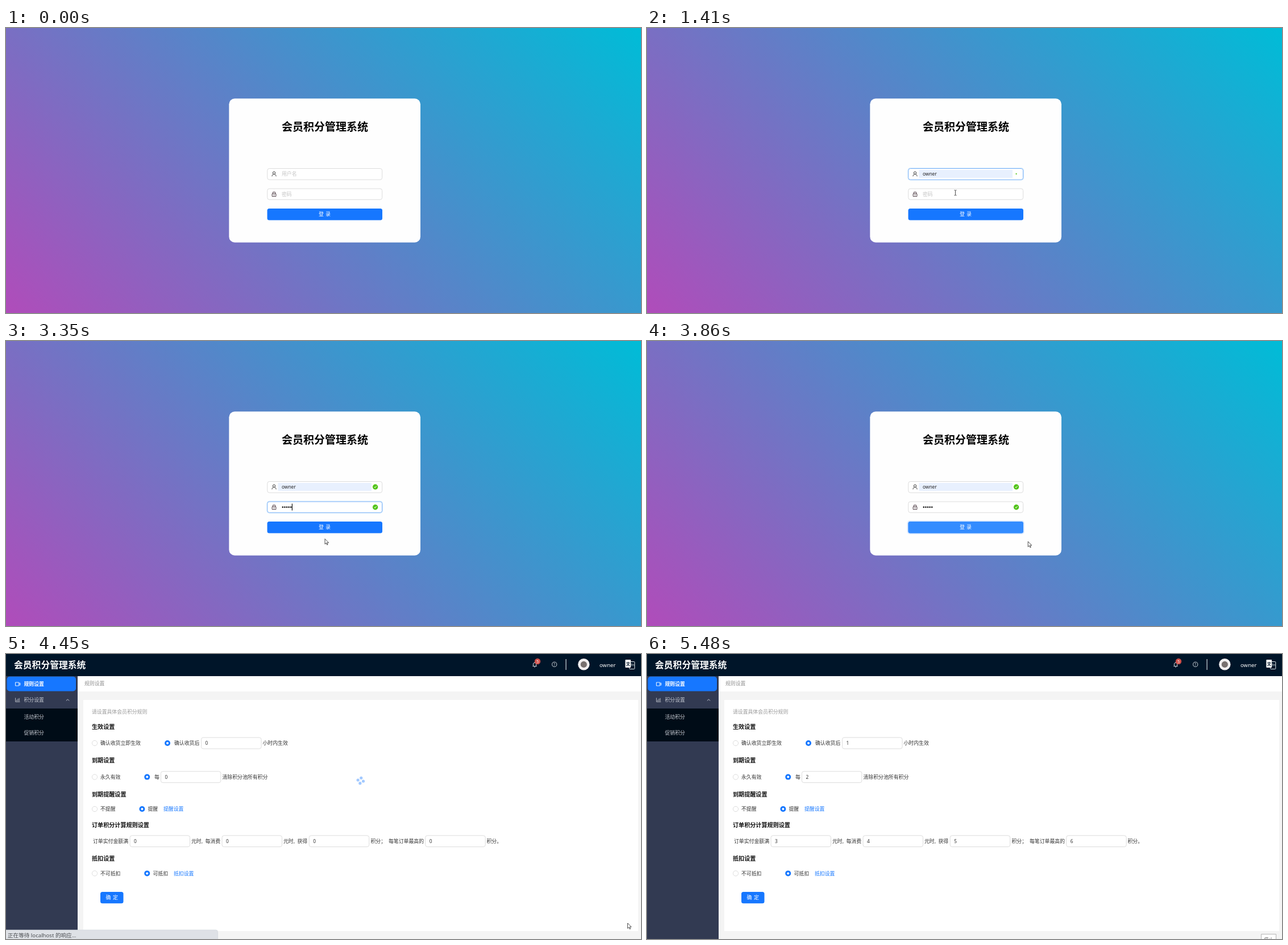
Recreate the animation shown at these times as an HTML page with a canvas. Size 1117 px wide and 502 px high, loop 5530 ms.

```html
<!DOCTYPE html>
<html lang="zh-CN">
<head>
<meta charset="utf-8">
<title>会员积分管理系统</title>
<style>
  html, body { margin: 0; width: 100%; height: 100%; overflow: hidden; }
  canvas { display: block; }
</style>
</head>
<body>
<canvas id="stage" width="1117" height="502"></canvas>
<script>
const W = 1117, H = 502, LOOP = 5530;
const BLUE = '#1677ff', INK = '#333', GREY = '#d9d9d9';
const FONT = '"Noto Sans", "Noto Sans CJK SC", sans-serif';
const TITLE = '会员积分管理系统', USER = 'owner';
const ctx = document.getElementById('stage').getContext('2d');

const clamp = v => Math.max(0, Math.min(1, v));
const ramp = (t, a, b) => clamp((t - a) / (b - a));
const within = (t, a, b) => t >= a && t < b;

function text(s, x, cy, size = 8.9, color = INK, weight = 400, align = 'left') {
  ctx.font = `${weight} ${size}px ${FONT}`;
  ctx.fillStyle = color;
  ctx.textAlign = align;
  ctx.fillText(s, x, cy + size * 0.37);
}

function rect(x, y, w, h, color) {
  ctx.fillStyle = color;
  ctx.fillRect(x, y, w, h);
}

function box(x, y, w, h, r, fill, stroke, lw = 1) {
  ctx.beginPath();
  ctx.roundRect(x, y, w, h, r);
  if (fill) { ctx.fillStyle = fill; ctx.fill(); }
  if (stroke) { ctx.strokeStyle = stroke; ctx.lineWidth = lw; ctx.stroke(); }
}

function disc(x, y, r, fill, stroke, lw = 1) {
  ctx.beginPath();
  ctx.arc(x, y, r, 0, Math.PI * 2);
  if (fill) { ctx.fillStyle = fill; ctx.fill(); }
  if (stroke) { ctx.strokeStyle = stroke; ctx.lineWidth = lw; ctx.stroke(); }
}

// Draws an SVG path with its origin moved to x, y.
function path(d, x, y, stroke, lw = 1, fill) {
  const p = new Path2D(d);
  ctx.save();
  ctx.translate(x, y);
  if (fill) { ctx.fillStyle = fill; ctx.fill(p); }
  if (stroke) { ctx.strokeStyle = stroke; ctx.lineWidth = lw; ctx.stroke(p); }
  ctx.restore();
}

/* ---------- login page ---------- */

function field(y, h, focused) {
  if (focused) box(458.8, y - 0.8, 203.8, h + 1.6, 4.2, null, 'rgba(5,145,255,.14)', 1.2);
  box(459.8, y, 201.8, h, 3.5, '#fff', focused ? '#69a8f5' : GREY, 0.9);
}

function check(y, t, start) {
  const k = ramp(t, start, start + 250);
  if (!k) return;
  ctx.save();
  ctx.translate(649.6, y);
  ctx.scale(k, k);
  disc(0, 0, 4.7, '#52c41a');
  path('M-2 0L-.5 1.6L2.1 -1.7', 0, 0, '#fff', 1);
  ctx.restore();
}

function caret(x, y) {
  rect(x, y - 6, 1.2, 12, '#111');
}

function login(t) {
  const g = ctx.createLinearGradient(153.75, 655.75, 963.25, -153.75);
  g.addColorStop(0, '#b04cba');
  g.addColorStop(1, '#00bcd7');
  rect(0, 0, W, H, g);
  box(392.3, 124.3, 336.7, 253.4, 10, '#fefefe');
  text(TITLE, 561, 174, 19, '#000', 700, 'center');

  const userFocus = within(t, 700, 1690);
  const passFocus = within(t, 1690, 3640) || within(t, 570, 660);
  const filled = t >= 1350;
  field(247.5, 19.7, userFocus);
  field(283, 19.3, passFocus);

  disc(471.5, 255.3, 2.2, null, '#222', 0.9);
  path('M-3.6 4.3C-3.4 -.9 3.4 -.9 3.6 4.3', 471.5, 257, '#222', 0.9);
  path('M-3.4 -.6H3.4V3.9H-3.4ZM-2 -.6V-3.6H2V-.6M0 1V2.5', 471.5, 292.6, '#3d2a33', 0.9);

  if (filled) {
    rect(478.5, 250, 164.5, 14, '#e8f0fe');
    text(USER, 485, 257, 8.3, '#222');
    check(257, t, 1350);
  } else {
    text('用户名', 485, 257, 8.9, '#c4c4c4');
  }
  if (within(t, 900, 1300)) caret(485, 257);

  const dots = [1870, 2280, 2510, 2790, 3020].filter(s => t >= s).length;
  if (!dots) text('密码', 485, 292.5, 8.9, '#c4c4c4');
  for (let i = 0; i < dots; i++) disc(486.8 + i * 3.6, 292.7, 1.35, '#222');
  if (within(t, 1700, 3640)) caret(485 + dots * 3.55, 292.5);
  check(292.7, t, 1870);

  const wave = ramp(t, 3650, 4050);
  if (wave > 0 && wave < 1) {
    ctx.globalAlpha = 0.3 * (1 - wave);
    box(459.5 - wave * 2, 318 - wave * 2, 202.5 + wave * 4, 20.4 + wave * 4, 4, null, BLUE, 1 + wave * 2);
    ctx.globalAlpha = 1;
  }
  box(459.5, 318, 202.5, 20.4, 3.5, BLUE);
  const hover = ramp(t, 3570, 3680) * (1 - ramp(t, 3800, 4000));
  if (hover) {
    ctx.globalAlpha = hover;
    box(459.5, 318, 202.5, 20.4, 3.5, '#4096ff');
    ctx.globalAlpha = 1;
  }
  text('登', 550, 328, 9, '#fff');
  text('录', 562, 328, 9, '#fff');
}

/* ---------- settings page ---------- */

function radio(x, y, on) {
  if (on) {
    disc(x, y, 5, BLUE);
    disc(x, y, 2, '#fff');
  } else {
    disc(x, y, 4.6, '#fff', GREY, 0.9);
  }
}

function input(x, y, value) {
  box(x, y - 9.9, 105.5, 19.8, 3.5, '#fff', GREY, 0.9);
  text(value, x + 7, y, 8.3);
}

function header() {
  rect(0, 0, W, 39, '#001529');
  text(TITLE, 14, 19, 15.8, '#fff', 900);
  path('M-3.6 3H3.6M-2.6 3V-.5C-2.6 -4 2.6 -4 2.6 -.5V3M-1 4.5H1M0 -3.2V-4.2', 930, 18.5, '#e6e9ec', 0.9);
  disc(935, 13, 5.2, '#cf4f4a');
  text('5', 935, 13, 7, '#fff', 400, 'center');
  disc(964.7, 18.3, 4.1, null, '#e6e9ec', 0.9);
  text('?', 964.7, 18.3, 6.3, '#e6e9ec', 400, 'center');
  rect(984.5, 9, 1.1, 19, '#e6e9ec');
  disc(1016.3, 18.2, 10.2, '#f1eff0');
  disc(1016.3, 18.4, 5.6, '#77706f');
  text(USER, 1044, 19, 9.6, '#fff');
  box(1096.5, 13.5, 9.3, 13, 1, null, '#e6e9ec', 1);
  box(1089.3, 10, 9.8, 14, 1, '#f4f5f6');
  text('文', 1094.2, 17, 7, '#001529', 700, 'center');
  text('En', 1102.2, 19.5, 5, '#fff', 400, 'center');
}

function sidebar() {
  const dim = '#c3c7cf';
  rect(0, 39, 126, H - 39, '#323a52');
  rect(0, 96, 126, 58, '#000c17');
  box(1.5, 39.7, 121.5, 25.8, 5, BLUE);
  path('M-4 -3H2.2V3H-4ZM2.2 -1L4.4 -2V2L2.2 1', 20.5, 53, '#fff', 0.9);
  text('规则设置', 31.5, 52.3, 8.9, '#fff', 700);
  path('M-3.8 -3.5V3.5H4M-1.7 2.5V0M.5 2.5V-2M2.7 2.5V-3', 20.5, 80.7, dim, 0.9);
  text('积分设置', 31.5, 80.7, 8.9, dim);
  path('M-2.6 1.4L0 -1.2L2.6 1.4', 108.5, 81, dim, 1);
  text('活动积分', 31.5, 111, 8.9, dim);
  text('促销积分', 31.5, 139, 8.9, dim);
}

function form(t) {
  const val = n => t < 4750 ? '0' : String(n);
  const head = (s, y) => text(s, 151, y, 10.1, '#111', 700);
  text('请设置具体会员积分规则', 151, 102, 8.85, '#999');

  head('生效设置', 128);
  radio(156, 157);
  text('确认收货立即生效', 166, 157);
  radio(284, 157, true);
  text('确认收货后', 296, 157);
  input(343.5, 157, val(1));
  text('小时内生效', 451.5, 157);

  head('到期设置', 187.5);
  radio(156, 216.6);
  text('永久有效', 166, 216.6);
  radio(248.2, 216.6, true);
  text('每', 261, 216.6);
  input(272.4, 216.7, val(2));
  text('清除积分池所有积分', 380.5, 216.6);

  head('到期提醒设置', 247);
  radio(156, 273);
  text('不提醒', 166, 273);
  radio(239.4, 273, true);
  text('提醒', 249.5, 273);
  text('提醒设置', 277, 273, 8.9, BLUE);

  head('订单积分计算规则设置', 301);
  text('订单实付金额满', 153, 330);
  input(218, 329.7, val(3));
  text('元时,', 326, 330);
  text('每消费', 350.5, 330);
  input(380, 329.7, val(4));
  text('元时,', 488, 330);
  text('获得', 512.5, 330);
  input(533.2, 329.7, val(5));
  text('积分；', 641.5, 330);
  text('每笔订单最高的', 673, 330);
  input(737.7, 329.7, val(6));
  text('积分。', 845.5, 330);

  head('抵扣设置', 360.5);
  radio(156, 386.4);
  text('不可抵扣', 166, 386.4);
  radio(248.2, 386.4, true);
  text('可抵扣', 258.5, 386.4);
  text('抵扣设置', 295, 386.4, 8.9, BLUE);

  box(166, 419, 40.5, 20.3, 3.5, BLUE);
  text('确', 175.5, 429, 9, '#fff', 500);
  text('定', 188, 429, 9, '#fff', 500);
}

function spinner(t, alpha) {
  const turn = (t - 4450) / 1200 * Math.PI * 2 + 0.2;
  for (let i = 0; i < 4; i++) {
    const a = turn + i * Math.PI / 2;
    ctx.globalAlpha = alpha * (0.4 + 0.25 * ramp(t, 4450 + i * 80, 4900));
    disc(623.8 + Math.sin(a) * 4.8, 223 - Math.cos(a) * 4.8, 2.6, BLUE);
  }
  ctx.globalAlpha = 1;
}

function settings(t) {
  rect(0, 0, W, H, '#f4f4f4');
  rect(126, 39, W - 126, 27, '#fff');
  rect(136, 81, 976, 407, '#fff');
  header();
  sidebar();
  text('规则设置', 138, 52, 8.9, '#909090');

  const gone = ramp(t, 4760, 5020);
  ctx.globalAlpha = 1 - 0.5 * ramp(t, 4450, 4700) * (1 - gone);
  form(t);
  ctx.globalAlpha = 1;
  if (gone < 1) spinner(t, 1 - gone);

  const tip = ramp(t, 5260, 5470);
  if (tip) {
    ctx.globalAlpha = tip;
    box(1080.5, 493.5, 26, 20, 0, '#fff', '#b5b5b5', 1);
    text('停止', 1093.5, 502.5, 8.5, '#666', 400, 'center');
    ctx.globalAlpha = 1;
  }
}

/* ---------- pointer and browser overlay ---------- */

const TRACK = [ // time, x, y
  [160, 1045, 489], [400, 800, 390], [590, 590, 298], [700, 533, 256], [950, 533, 256],
  [1250, 538, 285], [1650, 549, 298], [3070, 549, 298], [3250, 561, 348.5], [3480, 561, 348.5],
  [3600, 564, 329], [3800, 564, 329], [4090, 1069, 444], [4400, 1093.5, 472],
  [4450, 1093.5, 474], [4740, 1094, 477], [5100, 1096, 503]
];

function pointerAt(t) {
  const i = TRACK.findIndex(k => k[0] > t);
  if (i < 1) return null;
  const [t0, x0, y0] = TRACK[i - 1], [t1, x1, y1] = TRACK[i];
  const k = (t - t0) / (t1 - t0);
  return [x0 + (x1 - x0) * k, y0 + (y1 - y0) * k];
}

function pointer(t) {
  const at = pointerAt(t);
  if (!at || within(t, 1870, 3070)) return;
  const [x, y] = at;
  if (within(t, 760, 900) || within(t, 1610, 1730) || within(t, 3610, 3740)) {
    disc(x - 0.7, y, 8.8, 'rgba(255,240,40,.68)');
  }
  const inside = (top, bottom) => t < 4450 && x > 459 && x < 662 && y > top && y < bottom;
  if (inside(247, 267.5) || inside(283, 302.5)) {
    path('M-2 -4.5H-.6L0 -4L.6 -4.5H2M0 -4V4M-2 4.5H-.6L0 4L.6 4.5H2', x, y, '#333', 0.9);
  } else if (inside(318, 338.4)) {
    path('M-1 5V0Q0 -1.2 1 0V4L5.2 5Q6 5.4 5.8 6.6L5 10H0L-2.6 6.4Q-2.4 5 -1 6Z', x, y, '#222', 0.8, '#fff');
  } else {
    path('M0 0V9.3L2.2 7.3L3.7 10.6L5.1 10L3.7 6.8H6.6Z', x, y, '#222', 0.8, '#fff');
  }
}

function status() {
  box(-2, 486, 374.5, 20, [0, 3.5, 0, 0], '#dee1e6', '#cfd3d8', 0.6);
  text('正在等待 localhost 的响应...', 3, 495, 9.6, '#4a4d51');
}

function draw(t) {
  if (t < 4450) login(t);
  else settings(t);
  if (within(t, 4150, 4600)) status();
  pointer(t);
}

const start = performance.now();
function tick() {
  draw((performance.now() - start) % LOOP);
  requestAnimationFrame(tick);
}
tick();
</script>
</body>
</html>
```
